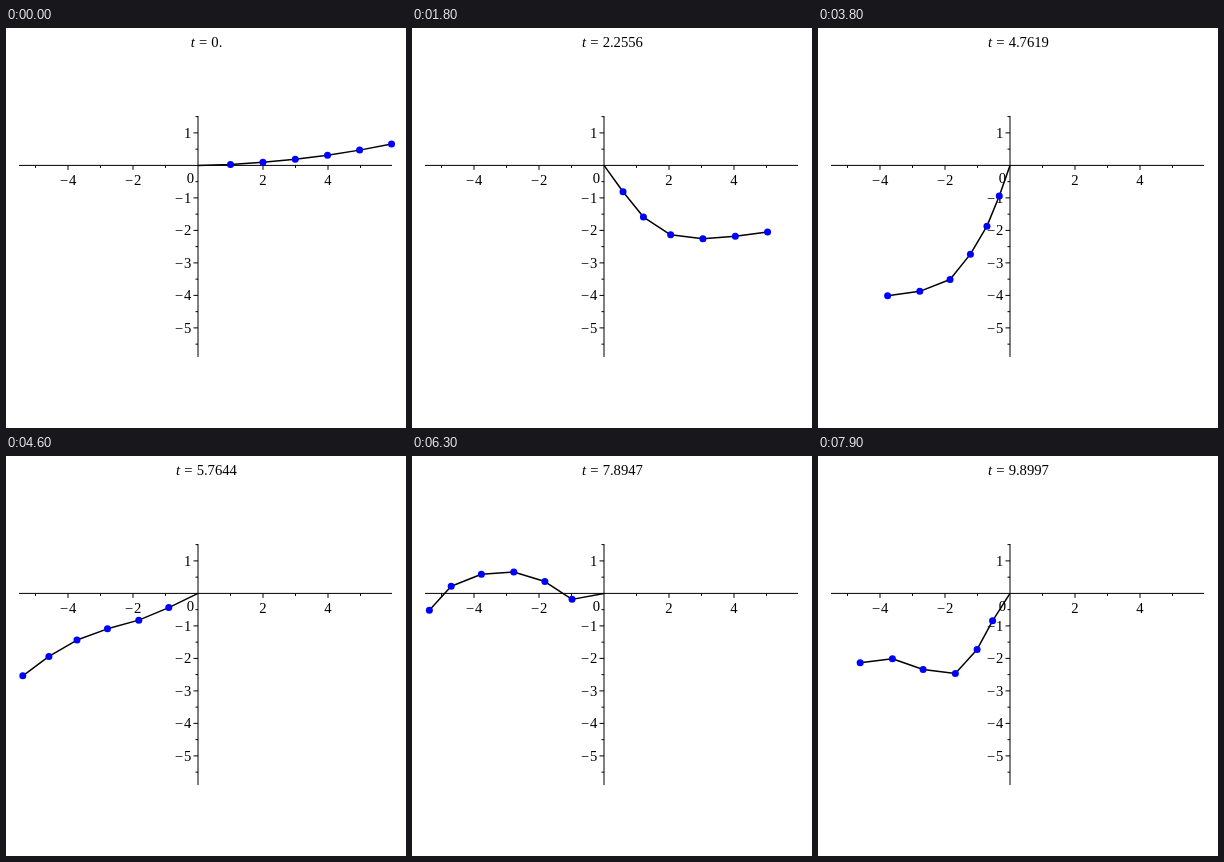
These frames come from a looping animation (400x400 px, 8000 ms). An HTML page:

```html
<!DOCTYPE html>
<html lang="en">
<head>
<meta charset="utf-8">
<title>Swinging chain</title>
<style>
html, body { margin: 0; width: 100%; height: 100%; overflow: hidden; background: #fff; }
svg { display: block; width: 400px; height: 400px; }
text { font: 14.67px "Liberation Serif", "Times New Roman", serif; fill: #000; }
#name { font-style: italic; }
.axis { stroke: #000; stroke-width: 1; }
#rods { fill: none; stroke: #000; stroke-width: 1.5; stroke-linejoin: round; }
#joints { fill: #00f; }
</style>
</head>
<body>
<svg viewBox="0 0 400 400">
  <g id="axes"></g>
  <polyline id="rods"/>
  <g id="joints"></g>
  <text id="name" y="19">t</text>
  <text id="equals" y="19">=</text>
  <text id="value" y="19"></text>
</svg>
<script>
const LINKS = 6, FRAMES = 80, STEP_MS = 100, DT = 50 / 399, GRAVITY = 1, SUBSTEPS = 100;
const UNIT = 32.5, OX = 192, OY = 137.4;
const $ = id => document.getElementById(id);
const links = [...Array(LINKS).keys()];

function add(parent, tag, attrs, text = '') {
  const el = document.createElementNS('http://www.w3.org/2000/svg', tag);
  for (const key in attrs) el.setAttribute(key, attrs[key]);
  el.textContent = text;
  return parent.appendChild(el);
}

function drawAxes() {
  const axes = $('axes');
  const line = (x1, y1, x2, y2) => add(axes, 'line', { x1, y1, x2, y2, class: 'axis' });
  const label = (x, y, anchor, n) =>
    add(axes, 'text', { x, y, 'text-anchor': anchor, dx: n < 0 ? '0 1' : 0 }, n < 0 ? '\u2212' + -n : n);
  line(13, OY, 386, OY);
  line(OX, 88, OX, 329);
  for (let n = -5; n <= 5; n++) {
    if (!n) continue;
    const x = OX + n * UNIT, major = n % 2 === 0;
    line(x, OY, x, OY + (major ? 4.5 : 2.5));
    if (major) label(x, 157, 'middle', n);
  }
  for (let h = -11; h <= 3; h++) {
    if (!h) continue;
    const y = OY - h * UNIT / 2, major = h % 2 === 0;
    line(OX - (major ? 4.5 : 2.5), y, OX, y);
    if (major) label(185.3, y + 5, 'end', h / 2);
  }
  label(184.5, 155, 'middle', 0);
}

// Gaussian elimination on an augmented matrix.
function solve(m) {
  for (const k of links) {
    for (let i = k + 1; i < LINKS; i++) {
      const f = m[i][k] / m[k][k];
      for (let j = k; j <= LINKS; j++) m[i][j] -= f * m[k][j];
    }
  }
  const out = [];
  for (let i = LINKS - 1; i >= 0; i--) {
    let sum = m[i][LINKS];
    for (let j = i + 1; j < LINKS; j++) sum -= m[i][j] * out[j];
    out[i] = sum / m[i][i];
  }
  return out;
}

// State: link angles from straight down, then their speeds.
function rates(s) {
  const matrix = links.map(i => {
    const row = [];
    let force = -(LINKS - i) * GRAVITY * Math.sin(s[i]);
    for (const j of links) {
      const mass = LINKS - Math.max(i, j), d = s[i] - s[j], w = s[LINKS + j];
      row.push(mass * Math.cos(d));
      force -= mass * Math.sin(d) * w * w;
    }
    return [...row, force];
  });
  return [...s.slice(LINKS), ...solve(matrix)];
}

// One Runge-Kutta step.
function advance(s, h) {
  const shift = (k, f) => s.map((v, i) => v + f * k[i]);
  const a = rates(s), b = rates(shift(a, h / 2)), c = rates(shift(b, h / 2)), d = rates(shift(c, h));
  return s.map((v, i) => v + h / 6 * (a[i] + 2 * b[i] + 2 * c[i] + d[i]));
}

function simulate() {
  let s = [...links.map(i => Math.PI / 2 + (i + 1) * Math.PI / 100), ...links.map(() => 0)];
  const poses = [];
  for (let n = 0; n < FRAMES; n++) {
    poses.push(s.slice(0, LINKS));
    for (let k = 0; k < SUBSTEPS; k++) s = advance(s, DT / SUBSTEPS);
  }
  return poses;
}

drawAxes();
const poses = simulate();
const joints = links.map(() => add($('joints'), 'circle', { r: 3.5 }));

function draw(n) {
  let x = OX, y = OY, path = `${x},${y}`;
  poses[n].forEach((angle, i) => {
    x += UNIT * Math.sin(angle);
    y += UNIT * Math.cos(angle);
    path += ` ${x},${y}`;
    joints[i].setAttribute('cx', x);
    joints[i].setAttribute('cy', y);
  });
  $('rods').setAttribute('points', path);

  const value = n ? (n * DT).toPrecision(5) : '0.';
  const digits = (value.length - 0.5) * 7.335;
  const left = 200.5 - (digits + 20.6) / 2;
  $('name').setAttribute('x', left);
  $('equals').setAttribute('x', left + 8.2);
  $('value').setAttribute('x', left + 20.6);
  $('value').textContent = value;
}

let shown = -1;
function tick() {
  const n = Math.floor(performance.now() / STEP_MS) % FRAMES;
  if (n !== shown) draw(shown = n);
  requestAnimationFrame(tick);
}
tick();
</script>
</body>
</html>
```
